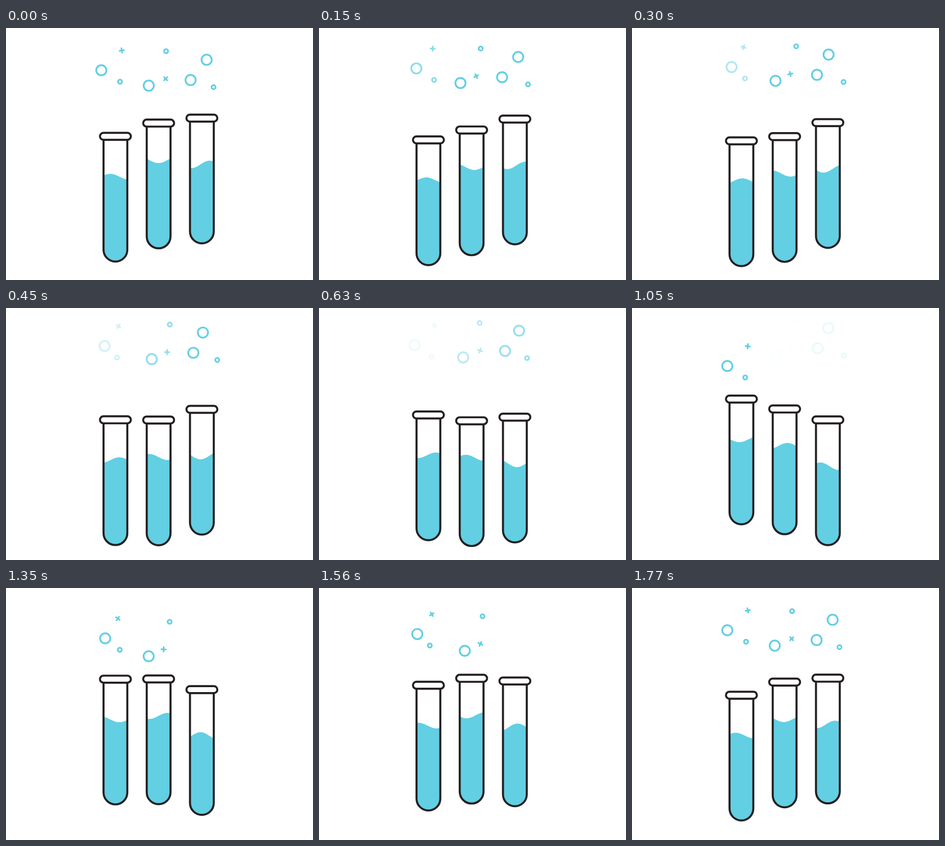
Recreate the animation shown at these times as an HTML page with a canvas. Size 560 by 460 pixels, loop 1.8 s.

```html
<!DOCTYPE html>
<html lang="en">
<head>
<meta charset="utf-8">
<title>Test tubes</title>
<style>
html, body { margin: 0; width: 100%; height: 100%; overflow: hidden; background: #fff; }
canvas { display: block; width: 560px; height: 460px; }
</style>
</head>
<body>
<canvas id="stage" width="560" height="460"></canvas>
<script>
const ctx = document.getElementById('stage').getContext('2d');
const LOOP = 1800, STEP = 30, SWAY = 705, TAU = Math.PI * 2;
const INK = '#231f20', BLUE = '#62cfe3';

// high: time of the topmost position; crest: time the wave crest is centred
const tubes = [
  { x: 199.6, high: 1197, crest: 255, level: 73.6, amp: 5.1 },
  { x: 278.4, high: 1490, crest: 912, level: 67.5, amp: 5.5 },
  { x: 357.3, high: 1803, crest: 1422, level: 84.5, amp: 6.8 }
];

// Each part: kind, resting x, sway distance, sway delay, final y
const groups = [
  { birth: 1030, end: 890, rise: 38.5, fade: 0, spin: 80, parts: [
    ['plus', 211.3, -8.2, -20, 31.3],
    ['big', 173.8, 8, -20, 67.4],
    ['small', 210, -7.8, 120, 88.3]] },
  { birth: 1330, end: 1190, rise: 37.7, fade: 290, spin: 48, parts: [
    ['small', 292, 8, 5, 23.9],
    ['big', 258, 8, 130, 86.9],
    ['plus', 286.7, 8.5, 185, 74.3]] },
  { birth: 1630, end: 1350, rise: 34, fade: 440, spin: 0, parts: [
    ['big', 366, -8, 10, 36],
    ['big', 334, 8, 140, 73],
    ['small', 378.5, 8, 10, 86]] }
];

const mod = (a, n) => ((a % n) + n) % n;

// Cubic bezier (.5, 0, .5, 1), solved by bisection
function ease(p) {
  let lo = 0, hi = 1;
  for (let i = 0; i < 24; i++) {
    const s = (lo + hi) / 2;
    if (1.5 * s * (1 - s) + s * s * s < p) lo = s; else hi = s;
  }
  return lo * lo * (3 - 2 * lo);
}

function rimY(tube, t) {
  const p = mod(t - tube.high, LOOP) / (LOOP / 2);
  return 164.5 + 41.5 * ease(p < 1 ? p : 2 - p);
}

function drawTube(tube, t) {
  const { x, level, amp, crest } = tube;
  const y = rimY(tube, t), r = 21.7, base = y + 228.6 - r;

  ctx.fillStyle = BLUE;
  ctx.beginPath();
  for (let dx = -r; dx <= r + 0.01; dx += r / 24) {
    const phase = dx / 66 - (t - crest) / LOOP;
    ctx.lineTo(x + dx, y + level - amp * Math.cos(TAU * phase));
  }
  ctx.lineTo(x + r, base);
  ctx.arc(x, base, r, 0, Math.PI);
  ctx.fill();

  ctx.strokeStyle = INK;
  ctx.lineWidth = 3.7;
  ctx.beginPath();
  ctx.moveTo(x + r, y + 6.4);
  ctx.lineTo(x + r, base);
  ctx.arc(x, base, r, 0, Math.PI);
  ctx.lineTo(x - r, y + 6.4);
  ctx.stroke();

  ctx.fillStyle = '#fff';
  ctx.beginPath();
  ctx.roundRect(x - 28.2, y - 6.4, 56.4, 12.8, 6.4);
  ctx.fill();
  ctx.stroke();
}

function ring(x, y, r, width) {
  ctx.lineWidth = width;
  ctx.beginPath();
  ctx.arc(x, y, r, 0, TAU);
  ctx.stroke();
}

function plus(x, y, degrees) {
  ctx.save();
  ctx.translate(x, y);
  ctx.rotate(degrees * Math.PI / 180);
  ctx.lineWidth = 3;
  ctx.beginPath();
  ctx.moveTo(-4, 0);
  ctx.lineTo(4, 0);
  ctx.moveTo(0, -4);
  ctx.lineTo(0, 4);
  ctx.stroke();
  ctx.restore();
}

function drawGroup(g, t) {
  const age = t >= g.birth ? t - LOOP : t;
  const left = Math.max(0, (g.end - age) / 1640);
  const lift = g.rise * Math.pow(left, 2.25);
  const life = Math.min(1, Math.max(0, 1 - (age - g.fade) / 850));
  ctx.globalAlpha = Math.pow(life, 1.6);
  ctx.strokeStyle = BLUE;
  ctx.lineCap = 'round';
  for (const [kind, x0, sway, delay, y0] of g.parts) {
    const x = x0 + sway * (1 - Math.cos(TAU * (age - delay) / SWAY)) / 2;
    const y = y0 + lift;
    if (kind === 'plus') plus(x, y, g.spin + age * 0.1);
    else if (kind === 'big') ring(x, y, 9.3, 3.2);
    else ring(x, y, 3.7, 3);
  }
  ctx.globalAlpha = 1;
  ctx.lineCap = 'butt';
}

function draw(now) {
  const t = Math.floor(mod(now, LOOP) / STEP) * STEP;
  ctx.fillStyle = '#fff';
  ctx.fillRect(0, 0, 560, 460);
  // Bubbles hold still over the loop seam
  const bubbleTime = t >= LOOP - STEP ? 0 : t;
  groups.forEach(g => drawGroup(g, bubbleTime));
  tubes.forEach(tube => drawTube(tube, t));
}

const start = performance.now();
function tick() {
  draw(performance.now() - start);
  requestAnimationFrame(tick);
}
tick();
</script>
</body>
</html>
```
